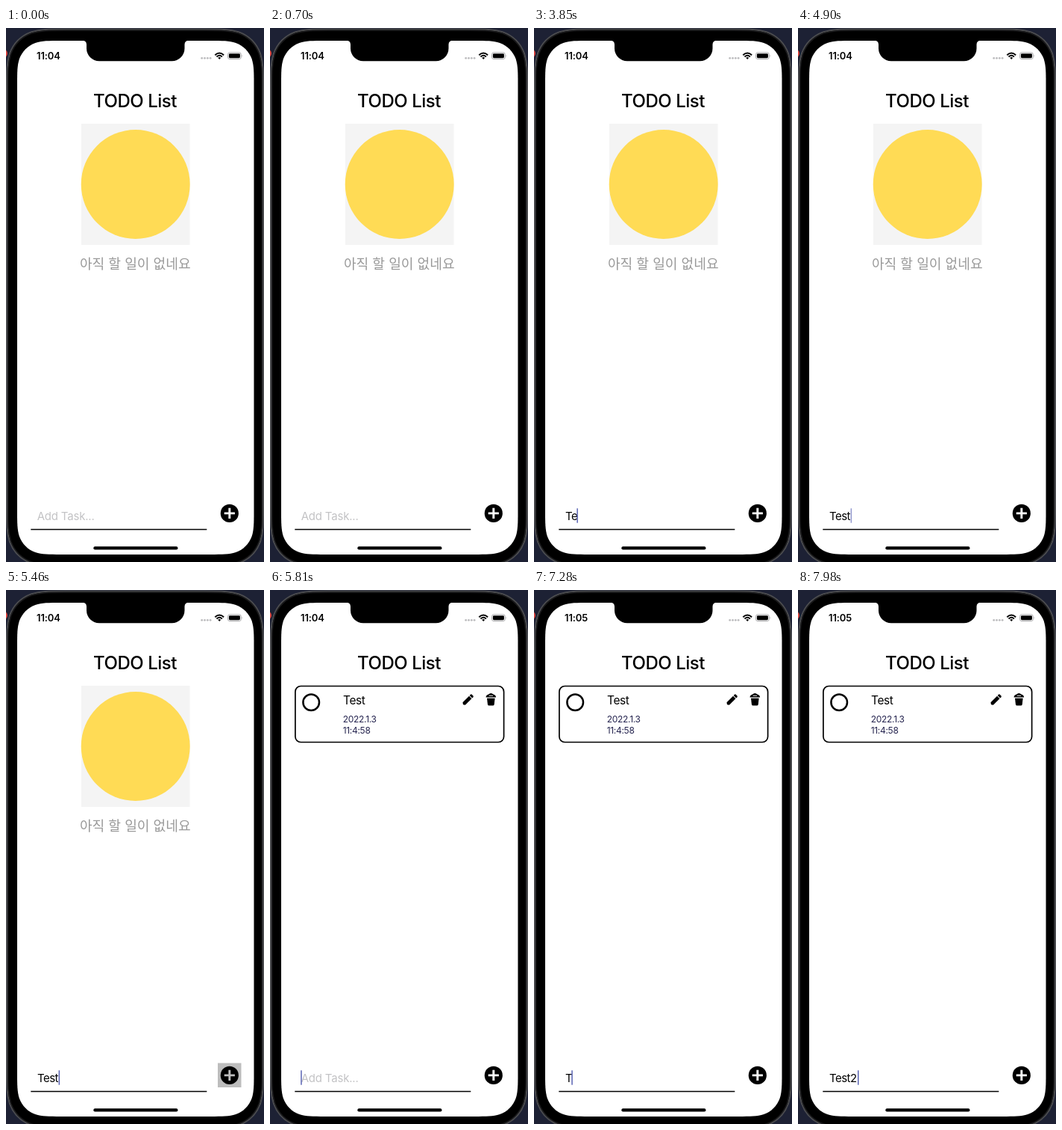
Write an HTML page that moves like this. It is 346x714 px and loops after 8000 ms.

```html
<!DOCTYPE html>
<html lang="ko">
<head>
<meta charset="utf-8">
<title>TODO List</title>
<style>
  html, body { margin: 0; width: 100%; height: 100%; overflow: hidden; background: #1d2134; }
  svg { display: block; width: 346px; height: 714px; }
  text { font-family: Inter, Roboto, sans-serif; fill: #000; white-space: pre; }
  .time { font-size: 13px; font-weight: 600; letter-spacing: -.1px; }
  .title { font-size: 24px; font-weight: 500; letter-spacing: -.45px; text-anchor: middle; }
  .empty { font: 18.15px "Noto Sans CJK KR", "Noto Sans CJK", sans-serif; fill: #999; text-anchor: middle; }
  .task { font-size: 15.5px; letter-spacing: -.4px; }
  .date { font-size: 12px; letter-spacing: -.3px; fill: #25244f; }
  .field { font-size: 15px; letter-spacing: -.55px; }
  .hint { font-size: 15px; letter-spacing: -.2px; fill: #c3c3c5; }
  .line { fill: none; stroke: #000; }
</style>
</head>
<body>
<svg viewBox="0 0 346 714">
  <rect width="346" height="714" fill="#1d2134"/>
  <circle cx="-4" cy="34" r="6" fill="#e0443e"/>

  <!-- phone -->
  <path id="rim" stroke="#4b4c4f" stroke-width="2"/>
  <path id="bezel" stroke="#1c1c1e" stroke-width="1.4"/>
  <path id="screen" fill="#fff"/>
  <path d="M102.500 16.500A5.500 5.500 0 0 1 108 22V27.300A17 17 0 0 0 125 44.300H222.500A17 17 0 0 0 239.500 27.300V22A5.500 5.500 0 0 1 245 16.500Z"/>

  <!-- status bar -->
  <text class="time" id="clock" x="41" y="42">11:04</text>
  <g fill="#bcbcbe">
    <circle cx="262.700" cy="40.300" r="1.400"/><circle cx="266.500" cy="40.300" r="1.400"/>
    <circle cx="270.300" cy="40.300" r="1.400"/><circle cx="274.100" cy="40.300" r="1.400"/>
  </g>
  <g class="line" stroke-width="1.900">
    <path d="M280.300 36.300Q286.200 30.900 292.100 36.300"/>
    <path d="M282.500 38.500Q286.200 35.200 289.900 38.500"/>
  </g>
  <path d="M284.200 39.800Q286.200 38.200 288.200 39.800L286.200 41.900Z"/>
  <rect x="297.500" y="32.800" width="17.800" height="8.800" rx="2.600" fill="none" stroke="#a2a2a4" stroke-width=".9"/>
  <rect x="298.900" y="34.200" width="15" height="6" rx="1.400"/>
  <path d="M316.600 35.700Q318.200 37.200 316.600 38.700Z" fill="#a2a2a4"/>

  <text class="title" x="173" y="105.500">TODO List</text>

  <g id="empty">
    <rect x="101" y="128" width="145.500" height="162" fill="#f4f4f4"/>
    <circle cx="173.700" cy="209" r="73" fill="#ffdb55"/>
    <text class="empty" x="173.300" y="322">아직 할 일이 없네요</text>
  </g>

  <g id="card">
    <rect class="line" x="33.900" y="128.500" width="279.700" height="75" rx="7.500" stroke-width="1.700"/>
    <circle class="line" cx="55.200" cy="150.200" r="10.800" stroke-width="2.500"/>
    <text class="task" x="98" y="153.300">Test</text>
    <text class="date" x="97.700" y="177">2022.1.3</text>
    <text class="date" x="97.700" y="191.800">11:4:58</text>
    <g transform="translate(259 153.200) rotate(-45)">
      <path d="M0 0L1.600 -2.400H13.800V2.400H1.600Z"/>
      <path d="M14.700 -2.400H16.600Q17.800 -2.400 17.800 -1.200V1.200Q17.800 2.400 16.600 2.400H14.700Z"/>
    </g>
    <path d="M291 144.800H301.600L300.700 152.900Q300.500 154.600 298.800 154.600H293.800Q292.100 154.600 291.900 152.900Z"/>
    <path d="M289.500 143.600Q289.600 140.700 293 139.600Q296.300 136.400 299.600 139.600Q303 140.700 303.100 143.600Z"/>
    <path d="M293.600 141.300H299" stroke="#fff" stroke-width=".9"/>
  </g>

  <!-- input row -->
  <text class="hint" id="hint" x="41.700" y="657.500">Add Task...</text>
  <text class="field" id="field" x="42" y="657.500"></text>
  <rect id="caret" y="642.300" width="1.500" height="19.400" fill="#5a64b4"/>
  <path class="line" d="M33.300 670.500H269.300" stroke-width="1.700"/>
  <rect id="press" x="284" y="632.500" width="31.500" height="32.500" fill="#bdbdbd"/>
  <circle cx="299.800" cy="648.900" r="12.100"/>
  <path id="plus" d="M292.700 648.900H306.900M299.800 641.800V656" stroke="#fff" stroke-width="2.900"/>
  <rect x="117.300" y="693.300" width="113.200" height="4.200" rx="2.100"/>
</svg>
<script>
  const LOOP = 8000, STEP = 70;
  const $ = id => document.getElementById(id);
  const clock = $('clock'), empty = $('empty'), card = $('card'), hint = $('hint'),
        field = $('field'), caret = $('caret'), press = $('press'), plus = $('plus');

  // Rectangle whose corners ease into the sides (continuous curvature)
  function smoothRect(x, y, w, h, r) {
    const ease = [[0, 1.529], [0, 1.088], [0, .868], [.075, .631], [.169, .373], [.373, .169],
                  [.631, .075], [.868, 0], [1.088, 0], [1.529, 0]];
    const corner = (right, bottom) => {
      const pts = ease.map(([a, b]) => [
        right ? x + w - a * r : x + a * r,
        bottom ? y + h - b * r : y + b * r
      ]);
      if (right !== bottom) pts.reverse();
      return 'L' + pts[0] + 'C' + pts.slice(1).join(' ');
    };
    const path = corner(false, false) + corner(true, false) + corner(true, true) + corner(false, true);
    return 'M' + path.slice(1) + 'Z';
  }
  $('rim').setAttribute('d', smoothRect(1, 1.5, 344, 718, 52));
  $('bezel').setAttribute('d', smoothRect(2.8, 3.3, 340.4, 714.4, 50));
  $('screen').setAttribute('d', smoothRect(15, 17, 317.5, 687, 38.5));

  // [time, text in the field]
  const typing = [
    [0, ''], [3360, 'T'], [3850, 'Te'], [4130, 'Tes'], [4340, 'Test'],
    [5810, ''], [7280, 'T'], [7420, 'Te'], [7630, 'Tes'], [7770, 'Test'], [7980, 'Test2']
  ];
  const caretX = [41.2, 50.3, 57.4, 65.3, 70.6, 80];

  // [time, caret shown, fades]
  const blinks = [
    [0, 0, 0], [2100, 1, 0], [3010, 0, 1], [3360, 1, 0], [4900, 0, 1],
    [5320, 1, 1], [6370, 0, 1], [6720, 1, 1]
  ];

  const at = (list, t) => list.filter(k => k[0] <= t).pop();
  const show = (el, on) => el.setAttribute('visibility', on ? 'visible' : 'hidden');

  function caretAlpha(t) {
    const [start, on, fades] = at(blinks, t);
    const p = fades ? Math.min(1, (Math.floor((t - start) / STEP) + 1) / 3) : 1;
    return on ? p : 1 - p;
  }

  function draw(now) {
    const t = now % LOOP;
    const text = at(typing, t)[1];
    const added = t >= 5810;
    const pressed = t >= 5460 && !added;

    clock.textContent = t < 6090 ? '11:04' : '11:05';
    show(empty, !added);
    show(card, added);
    show(hint, !text);
    field.textContent = text;
    caret.setAttribute('x', caretX[text.length]);
    caret.setAttribute('opacity', caretAlpha(t));
    show(press, pressed);
    plus.setAttribute('stroke', pressed ? '#bdbdbd' : '#fff');
  }

  const begin = performance.now();
  function tick() {
    draw(performance.now() - begin);
    requestAnimationFrame(tick);
  }
  tick();
</script>
</body>
</html>
```
